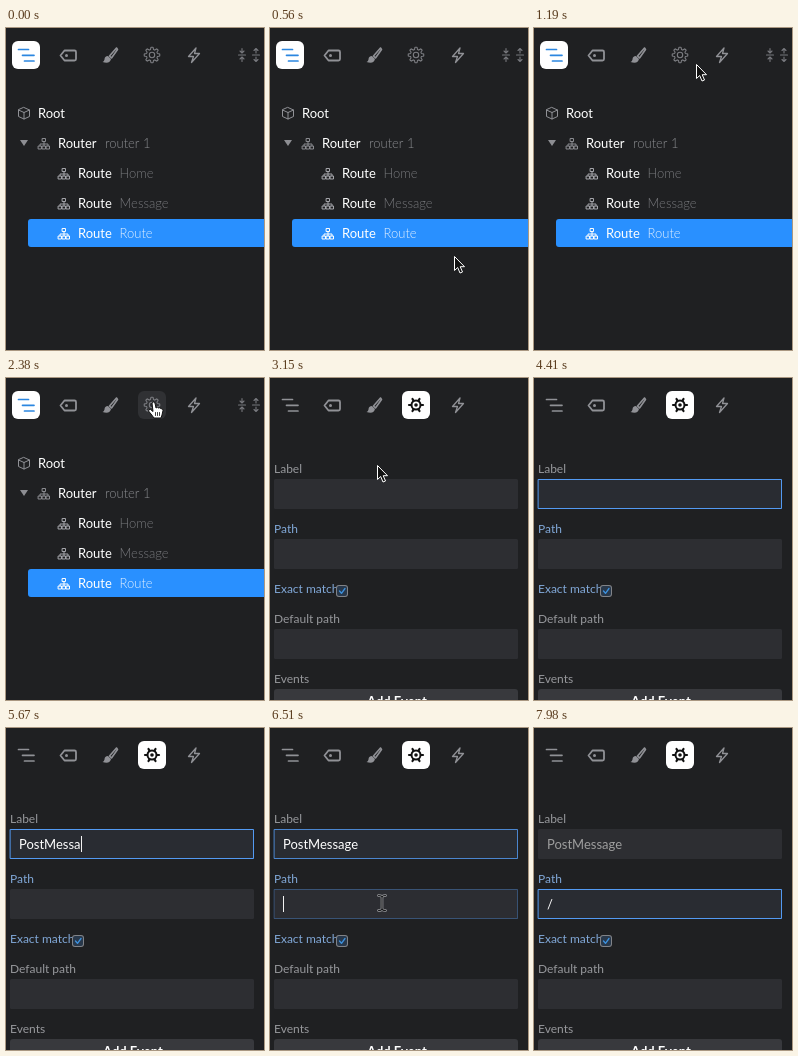
These frames come from a looping animation (258 px wide and 322 px high, 8000 ms). An HTML page with a canvas:

```html
<!DOCTYPE html>
<html lang="en">
<head>
<meta charset="utf-8">
<title>Route settings</title>
<style>
html, body { margin: 0; width: 100%; height: 100%; overflow: hidden; background: #1f2022; }
canvas { display: block; width: 258px; height: 322px; }
</style>
</head>
<body>
<canvas id="stage"></canvas>
<script>
const W = 258, H = 322, LOOP = 8000, STEP = 70;
const BG = '#1f2022', GREY = '#909196', FIELD = '#2d2e32', BLUE = '#2990ff';
const canvas = document.getElementById('stage');
const ctx = canvas.getContext('2d');
const ratio = window.devicePixelRatio || 1;
canvas.width = W * ratio;
canvas.height = H * ratio;

const clamp = v => Math.max(0, Math.min(1, v));
const ramp = (t, from, to) => clamp((t - from) / (to - from));
const ease = v => v * v * (3 - 2 * v);

function box(x, y, w, h, r, fill, alpha = 1) {
  ctx.globalAlpha = alpha;
  ctx.fillStyle = fill;
  ctx.beginPath();
  ctx.roundRect(x, y, w, h, r);
  ctx.fill();
  ctx.globalAlpha = 1;
}

function text(s, x, y, color, size = 13, weight = 400) {
  ctx.font = `${weight} ${size}px Lato, sans-serif`;
  ctx.fillStyle = color;
  ctx.fillText(s, x, y);
}

function line(d, color, width = 1, x = 0, y = 0) {
  ctx.save();
  ctx.translate(x, y);
  ctx.strokeStyle = color;
  ctx.lineWidth = width;
  ctx.lineJoin = ctx.lineCap = 'round';
  ctx.stroke(new Path2D(d));
  ctx.restore();
}

function shape(d, x, y, fill, edge) {
  ctx.save();
  ctx.translate(x, y);
  const p = new Path2D(d);
  ctx.fillStyle = fill;
  ctx.fill(p);
  if (edge) {
    ctx.strokeStyle = edge;
    ctx.lineWidth = 1;
    ctx.lineJoin = 'round';
    ctx.stroke(p);
  }
  ctx.restore();
}

function disc(x, y, r, color, stroke) {
  ctx.beginPath();
  ctx.arc(x, y, r, 0, 7);
  if (stroke) {
    ctx.strokeStyle = color;
    ctx.lineWidth = stroke;
    ctx.stroke();
  } else {
    ctx.fillStyle = color;
    ctx.fill();
  }
}

function gear(color) {
  ctx.beginPath();
  for (let i = 0; i <= 96; i++) {
    const a = i / 96 * Math.PI * 2;
    const r = 6.7 + 1.1 * Math.tanh(3 * Math.cos(8 * a));
    ctx.lineTo(146 + r * Math.cos(a), 27 + r * Math.sin(a));
  }
  ctx.strokeStyle = color;
  ctx.lineWidth = 1.1;
  ctx.stroke();
  disc(146, 27, 2.7, color, 1.1);
}

function solidGear() {
  disc(146, 27, 4.5, '#111', 2);
  disc(146, 27, 1.8, '#111');
  for (let i = 0; i < 6; i++) {
    const a = i * Math.PI / 3, c = Math.cos(a), s = Math.sin(a);
    line(`M${146 + c * 5} ${27 + s * 5}L${146 + c * 7} ${27 + s * 7}`, '#111', 2.2);
  }
}

function toolbar(settings, t) {
  if (!settings) box(6, 13, 28, 28, 6, '#fff');
  line('M12.5 21.5H22.5M16.5 27.3H28M18.5 33H28', settings ? GREY : '#2b86e0', 1.7);
  line('M58.5 22.5H68.5Q70 22.5 70 24V31Q70 32.5 68.5 32.5H58.5L54.5 27.5Z', GREY, 1.8);
  disc(60.5, 27.5, 1.5, GREY);
  line('M110.5 20L103.5 28L105.5 30L111.5 21.5Z', GREY, 1.6);
  shape('M102 28Q98.500 28 98.500 31.500Q98 33.500 96.500 34Q104 36.200 105 31Z', 0, 0, GREY);
  if (settings) {
    box(132, 13, 28, 28, 6, '#fff', 0.4 + 0.6 * ramp(t, 2450, 2660));
    solidGear();
  } else {
    box(132, 13, 28, 28, 6, '#303134', ramp(t, 1330, 1540));
    gear('#7c7d82');
  }
  line('M190 20L182.500 28.500H187.500L185.500 34.500L193.500 25.500H188.500Z', GREY, 1.3);
  if (!settings) {
    line('M236 20.500V25M234 23L236 25L238 23M236 33.500V29M234 31L236 29L238 31M232.500 27H239.500', '#77787d', 1.1);
    line('M250 20.500V25M248 22.500L250 20.500L252 22.500M250 33.500V29M248 31.500L250 33.500L252 31.500M246.500 27H253.500', '#77787d', 1.1);
  }
}

function tree(x, y, color) {
  line('M6 4V8M2 8V6H10V8', color, 1, x, y);
  for (const [dx, dy] of [[4.5, 0.5], [0.5, 8], [4.5, 8], [8.5, 8]])
    line(`M${dx} ${dy}h3v3h-3z`, color, 1, x, y);
}

function outline() {
  line('M18 79.500L23.500 82V88.500L18 91L12.500 88.500V82ZM12.500 82L18 84.500L23.500 82M18 84.500V91', GREY, 1);
  text('Root', 32, 90, '#fff');
  shape('M14 112H22L18 118Z', 0, 0, '#8d8e93');
  tree(32, 110, '#8b8c91');
  text('Router', 52, 120, '#fff');
  text('router 1', 99, 120, '#8b8c90', 13, 300);
  box(22, 191, 240, 28, 3, BLUE);
  ['Home', 'Message', 'Route'].forEach((name, i) => {
    const y = 150 + i * 30, on = i === 2;
    tree(52, y - 10, on ? '#fff' : '#a4a5aa');
    text('Route', 72, y, '#fff');
    text(name, 113.5, y, on ? '#e4f1ff' : '#77787c', 13, 300);
  });
}

const keys = [4480, 4620, 4690, 4830, 5110, 5250, 5390, 5600, 5670, 5880, 6020];
const focusA = 3500, focusB = 6440, slash = 7420;

function field(y, value, color, focus, caret) {
  box(4, y, 244, 30, 1.5, FIELD);
  if (focus > 0) {
    ctx.globalAlpha = focus;
    box(4, y, 244, 30, 1.5, '#292c32', focus);
    ctx.globalAlpha = focus;
    line(`M4.500 ${y + 0.5}h243v29h-243z`, '#539af2', 1);
    ctx.globalAlpha = 1;
  }
  text(value, 13, y + 20, color);
  if (caret) {
    ctx.font = '400 13px Lato, sans-serif';
    box(Math.round(13 + ctx.measureText(value).width), y + 7, 1, 16, 0, '#f2f2f2');
  }
}

function settingsPanel(t) {
  const label = 'PostMessage'.slice(0, keys.filter(k => t >= k).length);
  const inA = ramp(t, focusA, focusA + 280) * (1 - ramp(t, focusB + 20, focusB + 300));
  const inB = ramp(t, focusB - 40, focusB + 280);
  const caretA = t >= focusA && t < focusB && (t < 4060 || t >= keys[0]);
  const caretB = t >= focusB && (t < 7000 || t >= slash) && t < 7980;
  const tone = Math.round(255 - 97 * ramp(t, 6510, 6860));

  text('Label', 4, 95, '#97989c', 12);
  field(101, label, `rgb(${tone},${tone},${tone})`, inA, caretA);
  text('Path', 4, 155, '#81a8d8', 12);
  field(161, t >= slash ? '/' : '', '#fff', inB, caretB);
  text('Exact match', 4, 215, '#81a8d8', 12);
  box(66, 207, 12, 12, 3, '#818388');
  box(67, 208, 10, 10, 2, '#28384b');
  line('M69.500 213L71.500 215.300L75 210.500', '#3d92e0', 1.3);
  text('Default path', 4, 245, '#97989c', 12);
  field(251, '', '#fff', 0, false);
  text('Events', 4, 305, '#97989c', 12);
  box(4, 311, 244, 30, 3, '#38393d');
  text('Add Event', 97, 328, '#fff', 13, 700);
}

// time, x, y of the pointer's hot spot
const route = [
  [0, 259, 302], [280, 228, 274], [560, 184, 228], [770, 160, 206], [840, 160, 206],
  [1050, 161, 96], [1190, 162, 36], [1400, 151, 28], [1540, 150, 27], [1890, 150, 27],
  [2240, 148, 25], [2380, 147, 24], [2940, 147, 24], [3150, 107, 87],
  [3430, 92, 114], [3780, 92, 114], [3920, 141, 112], [6020, 141, 112],
  [6370, 112, 175], [8000, 112, 175]
];

function pointerAt(t) {
  let i = 1;
  while (i < route.length - 1 && route[i][0] < t) i++;
  const [t0, x0, y0] = route[i - 1], [t1, x1, y1] = route[i];
  const k = ease(ramp(t, t0, t1));
  return [x0 + (x1 - x0) * k, y0 + (y1 - y0) * k];
}

function pointer(t) {
  if ((t >= 4410 && t < 6020) || t >= 7350 || t < STEP) return;
  const [x, y] = pointerAt(t);
  const overGear = x > 132 && x < 160 && y > 13 && y < 41 && t > 1190;
  const overField = t > 2520 && y > 101;
  if (overGear && t > 1260) {
    shape('M0 1Q1.500-1 3 1L4 6Q5.500 4.500 6.500 6Q8 5 9 6.700Q11 6 11 8.500L10 13L9 16H2L1-2 10'.replace('L1-2 10', '') +
      'L-1 12L-3.500 9Q-3.500 7 -1.500 7.500L1 9.500Z', x - 1, y, '#fff', '#111');
    line('M3.500 10.500V13.500M5.500 10.500V13.500M7.500 10.500V13.500', '#111', 0.8, x - 1, y);
  } else if (overField) {
    const beam = 'M-3.500-7.500Q0-7.500 0-5.500Q0-7.500 3.500-7.500M0-5.500V5.500M-3.500 7.500Q0 7.500 0 5.500Q0 7.500 3.500 7.500';
    line(beam, '#a0a1a4', 2.6, x, y);
    line(beam, '#161719', 1.1, x, y);
  } else {
    shape('M0.500 0.500V14.500L3.700 11.500L6 17L8.500 16L6.200 10.700H10.500Z', x, y, '#111', '#fff');
  }
}

function draw(now) {
  const t = Math.floor((now % LOOP) / STEP) * STEP;
  const settings = t >= 2520;
  ctx.setTransform(ratio, 0, 0, ratio, 0, 0);
  ctx.fillStyle = BG;
  ctx.fillRect(0, 0, W, H);
  toolbar(settings, t);
  if (settings) settingsPanel(t);
  else outline();
  pointer(t);
  requestAnimationFrame(draw);
}
requestAnimationFrame(draw);
</script>
</body>
</html>
```
